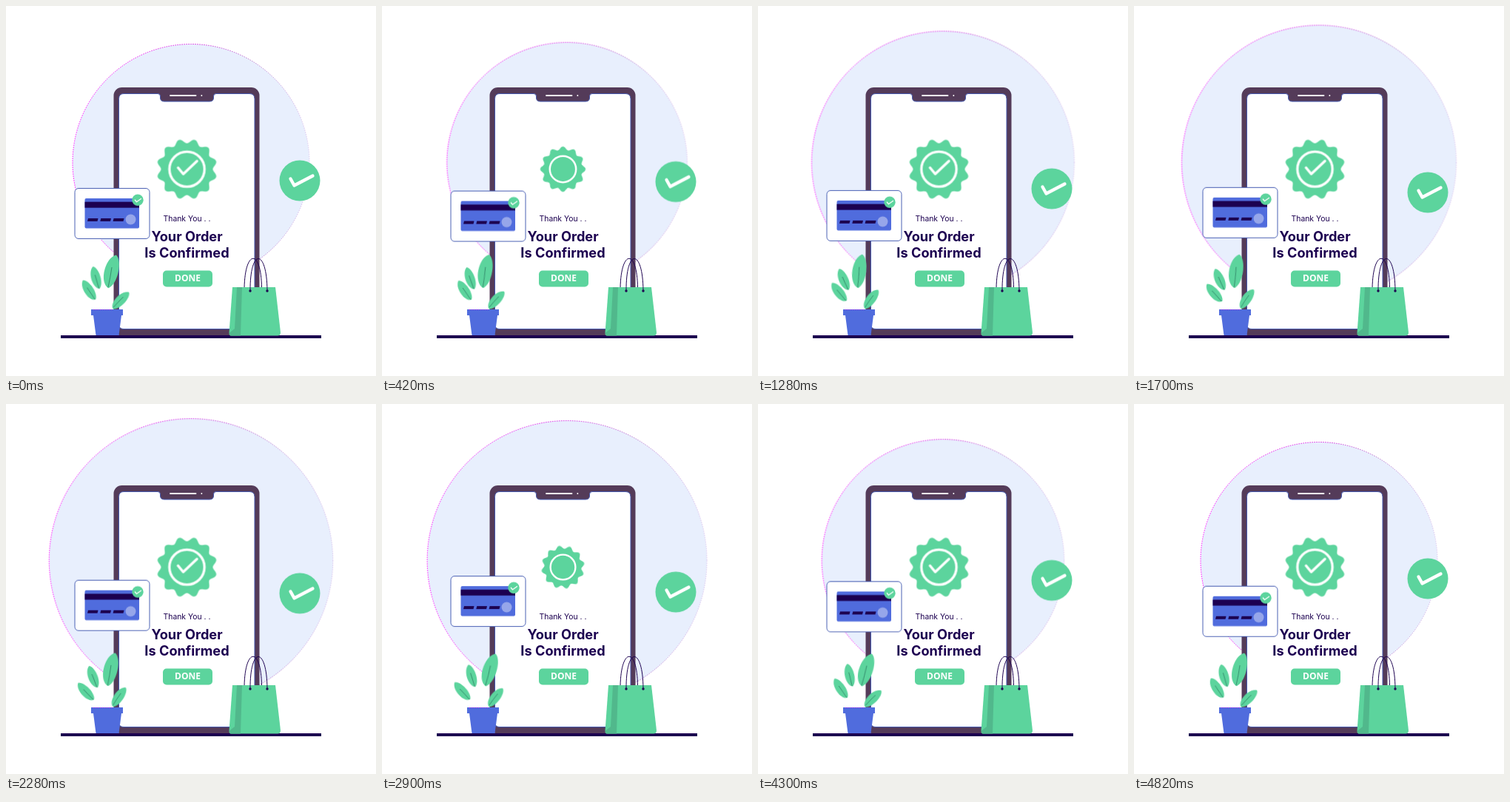
An HTML page that plays this animation: 500 px wide and 500 px high, repeating every 4840 ms.

```html
<!DOCTYPE html>
<html lang="en">
<head>
<meta charset="utf-8">
<title>Order confirmed</title>
<style>
  html, body { margin: 0; width: 100%; height: 100%; overflow: hidden; background: #fff; }
  svg { display: block; width: 100vw; height: 100vh; }
  .green { fill: #5cd49d; }
  .blue { fill: #506cdd; }
  .ink { fill: #1c0050; }
  .frame { fill: #543b59; }
  .tick { fill: none; stroke: #fff; stroke-linecap: round; stroke-linejoin: round; }
  .vein { fill: none; stroke: #2c7d63; stroke-width: .8; }
  .handle { fill: none; stroke: #1c0050; stroke-width: 1; }
  text { text-anchor: middle; fill: #1c0050; font-family: Inter, sans-serif; }
  .title { font-size: 18.2px; font-weight: 700; }
</style>
</head>
<body>
<svg viewBox="0 0 500 500">
  <defs>
    <linearGradient id="rim">
      <stop offset="0" stop-color="#f0f"/>
      <stop offset=".5" stop-color="#d818e0"/>
      <stop offset=".75" stop-color="#b06cc8"/>
      <stop offset="1" stop-color="#d9c4ee"/>
    </linearGradient>
    <path id="leaf" d="M2-23C12-18 13 15 1 23C-13 18-12-16 2-23Z"/>
  </defs>

  <circle id="halo" cx="250" cy="211.5" r="160" fill="#e8effd" stroke="url(#rim)"
    stroke-dasharray="1.5 1.500" vector-effect="non-scaling-stroke"/>

  <g id="phone">
    <rect class="frame" x="145.5" y="110" width="197" height="335.5" rx="11"/>
    <path d="M159 118.500H205Q208.500 118.500 208.500 122V124Q208.500 129 214 129H275Q280.500 129 280.500 124V122Q280.500 118.500 284 118.500H329Q336 118.500 336 125.500V430Q336 436.500 329 436.500H159Q152.500 436.500 152.500 430V125.500Q152.500 118.500 159 118.500Z"
      fill="#fff" stroke="#4458ae"/>
    <path class="tick" stroke-width="1.8" d="M222 121H256.500M264.300 121h.1"/>
    <text x="244.500" y="291" font-size="10.4">Thank You . .</text>
    <text class="title" x="244.500" y="317.500">Your Order</text>
    <text class="title" x="244.500" y="339.500">Is Confirmed</text>
    <rect class="green" x="212" y="357.500" width="67" height="22" rx="5"/>
    <text x="245.500" y="372.300" style="font:700 12px 'Open Sans',sans-serif;fill:#fff">DONE</text>
  </g>

  <g transform="translate(244.500 220.500)">
    <g id="seal">
      <path id="burst" class="green"/>
      <circle r="23.700" fill="none" stroke="#fff" stroke-width="3.300"/>
      <path id="sealTick" class="tick" stroke-width="3.500" pathLength="1" stroke-dasharray="1 2" d="M-12-2L-5 6.500L13.500-11"/>
    </g>
  </g>

  <rect class="ink" x="74" y="445" width="352" height="4"/>

  <g id="card">
    <rect x="93" y=".5" width="101" height="68" rx="5" fill="#fff" stroke="#4a60b4"/>
    <rect class="blue" x="106.500" y="14" width="73.500" height="40.500" rx="2"/>
    <rect class="ink" x="106.500" y="18.700" width="73.500" height="8"/>
    <path class="ink" d="M111 41h13.500l-1 4H110zM128.300 41H142l-1 4H127.300zM145.600 41H159.500l-1 4H144.600z"/>
    <circle cx="168.500" cy="42.500" r="7" fill="#96a6ea"/>
    <circle class="green" cx="178" cy="16.300" r="7.700"/>
    <path class="tick" stroke-width="1.300" d="M174.300 16.300L176.500 18.800L182.500 14.500"/>
  </g>

  <g id="plant">
    <g id="leafTop">
      <use href="#leaf" class="green" transform="translate(142 358.500) rotate(12)"/>
      <path class="vein" d="M143 353Q141 367 138 380"/>
    </g>
    <g id="leafMid">
      <use href="#leaf" class="green" transform="translate(119.500 368) rotate(-20) scale(.68)"/>
      <path class="vein" d="M118.500 364L124.500 382"/>
    </g>
    <g id="leafLeft">
      <use href="#leaf" class="green" transform="translate(109.500 386.500) rotate(-40) scale(.68)"/>
      <path class="vein" d="M107 383L119 398"/>
    </g>
    <g id="leafRight">
      <use href="#leaf" class="green" transform="translate(153.500 396.500) rotate(38) scale(.68)"/>
      <path class="vein" d="M157 392Q150 400 145 407"/>
    </g>
    <path class="blue" d="M115 410H158V418H156L152.500 445H121.500L118 418H115Z"/>
    <path d="M118 410.300H143" stroke="#f0f" stroke-width=".8" stroke-dasharray="1 2"/>
  </g>

  <g id="bag">
    <path class="handle" d="M322 381C323 328 345 328 345.500 381"/>
    <path class="green" d="M306 380H364L371 441Q371 445.500 367 445.500H304Q301.500 445.500 301.500 442Z"/>
    <path d="M312 380H319L317 445.500H304Q301.500 445.500 302 441.500L309 436Z" fill="#51b88c"/>
    <path class="handle" d="M330 385C329.500 327 352.500 327 353 385"/>
    <circle class="ink" cx="330" cy="385" r="1.700"/>
    <circle class="ink" cx="353" cy="385" r="1.700"/>
  </g>

  <g id="done">
    <circle class="green" cx="397" r="27.500"/>
    <path class="tick" stroke-width="4.300" d="M384.500-2.500L389.500 6.500L414.500-6.500"/>
  </g>
</svg>
<script>
  const LOOP = 4840, HALF = LOOP / 2;
  const SINE = 'cubic-bezier(.364,0,.636,1)';
  const $ = id => document.getElementById(id);

  // Swings between two transforms; the first pose is reached at time `at`.
  function swing(id, from, to, at = 0, origin = '0 0') {
    $(id).style.transformOrigin = origin;
    $(id).animate(
      [{ transform: from, easing: SINE }, { transform: to }],
      { duration: HALF, direction: 'alternate', iterations: Infinity, delay: at - LOOP });
  }

  const moveY = y => `translate(0px, ${y}px)`;
  const sway = (id, deg, at, origin) =>
    swing(id, `rotate(${-deg}deg)`, `rotate(${deg}deg)`, at, origin);

  // Wavy edge with 12 teeth and a dip at the top.
  const points = Array.from({ length: 168 }, (_, i) => {
    const a = i / 168 * 2 * Math.PI, r = 38 - 3 * Math.cos(12 * a);
    return `${(r * Math.sin(a)).toFixed(2)} ${(-r * Math.cos(a)).toFixed(2)}`;
  });
  $('burst').setAttribute('d', `M${points.join('L')}Z`);

  swing('halo', 'scale(1)', 'scale(1.2)', 0, '250px 211.5px');
  swing('done', moveY(236), moveY(256));
  swing('card', moveY(250.7), moveY(231.3), 800);
  sway('leafTop', 6.2, 1210, '136px 410px');
  sway('leafMid', 6, 1500, '136px 410px');
  sway('leafLeft', 5.2, 2350, '136px 410px');
  sway('leafRight', 5.8, 1950, '143px 410px');

  // Shrinks and comes back in the first half, then rests.
  const pulse = (id, rest, peak) => $(id).animate([
    { transform: rest, easing: SINE },
    { transform: peak, offset: .25, easing: SINE },
    { transform: rest, offset: .5 },
    { transform: rest }
  ], { duration: HALF, iterations: Infinity });

  pulse('seal', 'scale(1)', 'scale(.68)');
  pulse('burst', 'rotate(0deg)', 'rotate(-95deg)');

  $('sealTick').animate([
    { strokeDashoffset: 0, easing: SINE },
    { strokeDashoffset: 1.02, offset: .155 },
    { strokeDashoffset: 1.02, offset: .345, easing: SINE },
    { strokeDashoffset: 0, offset: .52 },
    { strokeDashoffset: 0 }
  ], { duration: HALF, iterations: Infinity });
</script>
</body>
</html>
```
